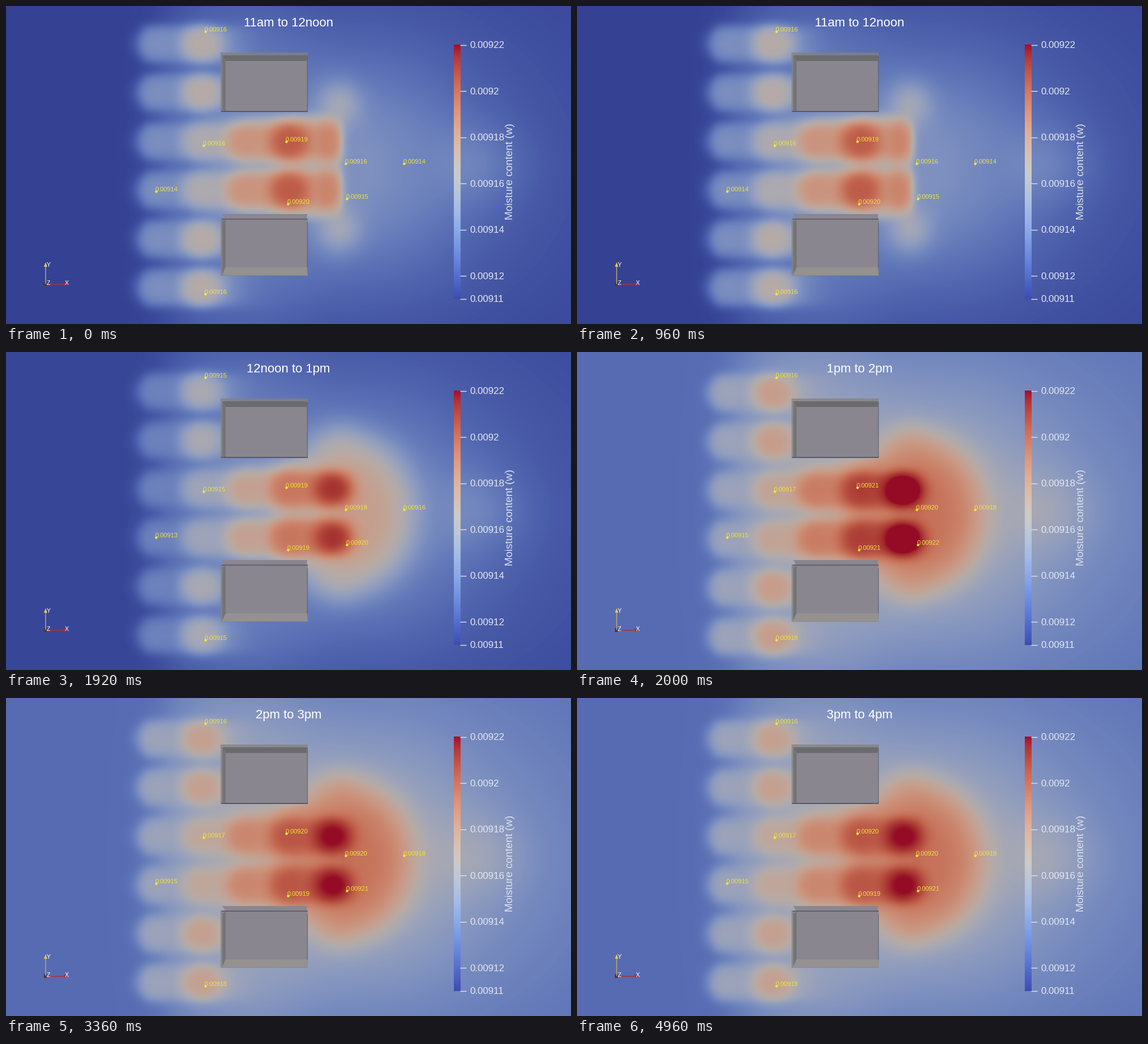
Write a matplotlib script that moves like this. It is 998 px wide and 561 px high and loops after 5.04 s.

```python
import numpy as np
import matplotlib.pyplot as plt
from matplotlib.animation import FuncAnimation
from matplotlib.patches import Polygon

W, H, DPI = 998, 561, 64
FRAMES, INTERVAL = 63, 80
FONT = "Liberation Sans"

CLOCK = ["11am", "12noon", "1pm", "2pm", "3pm", "4pm"]
# Per hour: background, first jet level, rise per jet column, plume spread.
# Levels run from 0 (0.00911) to 1 (0.00922).
LEVELS = [(.01, .27, .19, 0), (.02, .22, .18, 1), (.14, .39, .175, 1),
          (.14, .39, .155, 1), (.14, .39, .155, 1)]
# Last three digits at each probe, per hour
READINGS = ["916 916 919 916 914 914 920 915 916",
            "915 915 919 918 916 913 919 920 915",
            "916 917 921 920 918 915 921 922 918",
            "916 917 920 920 918 915 919 921 918",
            "916 917 920 920 918 915 919 921 918"]
PROBES = [(352, 45), (349, 246), (495, 239), (600, 278), (703, 278),
          (265, 327), (498, 349), (602, 340), (352, 508)]

X, Y = np.meshgrid(np.arange(W) + 0.5, np.arange(H) + 0.5)


def bump(cx, cy, rx, ry, k=1):
    return np.exp(-(((X - cx) / rx) ** 2 + ((Y - cy) / ry) ** 2) ** k)


def gate(v, start, width):
    """Soft step from 0 to 1; a negative width steps down."""
    return 1 / (1 + np.exp(-np.clip((v - start) / width, -50, 50)))


def mix(field, target, mask):
    return field + (target - field) * mask


def shade(values, gain, lift):
    rgb = plt.get_cmap("coolwarm")(np.clip(values, 0, 1))[..., :3]
    return np.clip(rgb * gain + lift, 0, 1)


def add_jets(field, row, hour):
    _, first, step, spread = LEVELS[hour]
    cy = 67 + 86 * row + min(2.5 * hour, 5)
    inner = row in (2, 3)
    count = 5 if inner else 2
    centers = 268 + 77.5 * np.arange(count)
    levels = first + step * np.arange(count)
    if inner:
        centers[-1] -= 11 * (1 - spread)
        levels[-1] -= 1.7 * step * (1 - spread)
        end, fade = 590 - 15 * spread, 5 + 10 * spread
    else:
        levels[-1] += 0.04
        end, fade = 395, 22

    trunk = np.exp(-((Y - cy) / 33) ** 4) * gate(X, 243, 5) * gate(X, end, -fade)
    field = mix(field, np.interp(X, centers, levels) - 0.07, 0.85 * trunk)
    for i, (cx, level) in enumerate(zip(centers, levels)):
        rx = 22 + 15 * spread if i == 4 else 37
        field = mix(field, level, bump(cx, cy, rx, 29 + i, 1.5))
    return field


def render(hour):
    base, first, _, spread = LEVELS[hour]
    far = 0.09 + 1.5 * base
    halo = first + 0.27
    inlet = gate(X, 275, 20)

    field = mix(np.full((H, W), base), far, bump(640, 280, 430, 330) * inlet)
    field = mix(field, far + 0.065, bump(400, 285, 190, 300, 2) * inlet)
    field = mix(field, far + 0.18, bump(620, 285, 180, 175) * inlet)
    field = mix(field, far + 0.13, bump(800, 280, 90, 65))
    for side in (-1, 1):
        field = mix(field, first + 0.15, bump(588, 284 + 108 * side, 38, 40))
    field = mix(field, halo, spread * bump(602, 285, 127, 142, 2.5))
    field = mix(field, halo + 0.11, spread * bump(602, 285, 88, 106, 2))

    ramp = np.clip((X - 320) / 190, 0, 1)
    channel = ramp * gate(X, 592, -4) * gate(Y, 191, 5) * gate(Y, 375, -5)
    field = mix(field, first + 0.23 + 0.08 * spread * ramp, channel * (1 - 0.3 * spread))
    for row in range(6):
        field = add_jets(field, row, hour)
    return shade(field, (0.80, 0.74, 0.71), (0.02, 0.03, 0.04))


fig = plt.figure(figsize=(W / DPI, H / DPI), dpi=DPI)
ax = fig.add_axes([0, 0, 1, 1])
ax.axis("off")


def pt(px):
    return px * 72 / DPI


def label(x, y, text, px, color="white", **kw):
    return ax.text(x, y, text, fontsize=pt(px), color=color, family=FONT, **kw)


def line(x, y, color, px=1.2):
    ax.plot(x, y, color=color, lw=pt(px), solid_capstyle="butt")


def poly(color, *points, alpha=1):
    ax.add_patch(Polygon(points, fc=color, ec="none", alpha=alpha))


def rect(color, x0, y0, x1, y1, alpha=1):
    poly(color, (x0, y0), (x1, y0), (x1, y1), (x0, y1), alpha=alpha)


def draw_block(top, face_top, face_bottom, bottom, rim, sill):
    """A grey block seen from above with its lit or shaded side walls."""
    rect("#84827f", 379, top, 533, bottom, 0.75)
    poly(rim, (382, face_top - 10), (532, face_top - 10), (531, face_top), (388, face_top))
    poly("#747477", (382, top + 5), (388, face_top), (388, face_bottom), (382, bottom - 3))
    poly(sill, (388, face_bottom), (531, face_bottom), (533, bottom - 1), (382, bottom - 1))
    rect("#898690", 388, face_top, 531, face_bottom)
    line([532, 532], [top + 6, face_bottom], "#626376")


def draw_colorbar():
    ramp = shade(np.linspace(1, 0, 449)[:, None], 0.87, 0.04)
    ax.imshow(ramp, extent=(791, 802.5, 517.5, 68.5), aspect="auto", zorder=1)
    for value in (922, 920, 918, 916, 914, 912, 911):
        y = 68.5 + (922 - value) * 40.77
        line([802.5, 813], [y, y], "#dfe3ee", 1.4)
        label(819, y + 5.5, f"0.00{value}".rstrip("0"), 17, "#e4e7f1")
    label(899, 292, "Moisture content (w)", 18.9, "#dde1ee", rotation=90,
          ha="right", va="center")


def draw_axes():
    line([70, 70], [490, 460], "#b9a774", 1.5)
    line([70, 104], [490.5, 490.5], "#b32d3c", 1.5)
    poly("#e8c93c", (70, 452), (67, 460), (73, 460))
    poly("#c3202c", (109, 490.5), (102, 487.5), (102, 493.5))
    rect("#3b3d3c", 67, 487, 72.5, 494)
    for x, y, name in ((71.5, 460, "Y"), (72, 491.5, "Z"), (103.5, 491.5, "X")):
        label(x, y, name, 10.5)


fields = [render(hour) for hour in range(len(LEVELS))]
picture = ax.imshow(fields[0], extent=(0, W, H, 0), interpolation="nearest", zorder=0)
draw_block(82, 97, 186, 187, "#6b6b6d", "#4d4e60")
line([380, 533], [185.7, 185.7], "#4d4e60", 1.6)
draw_block(375, 377, 461, 476, "#898690", "#949190")
rect("#858480", 379, 367, 533, 375, 0)
line([381, 533], [375.5, 375.5], "#565765", 1.6)
draw_colorbar()
draw_axes()
ax.scatter(*zip(*PROBES), s=pt(4.4) ** 2, c="#f6ea2c", lw=0, zorder=4)
readings = [label(x - 1.5, y - 0.5, "", 11.1, "#eee338", zorder=5) for x, y in PROBES]
title = label(499, 36, "", 22.1, ha="center")
ax.set_xlim(0, W)
ax.set_ylim(H, 0)


def update(frame):
    hour = int((frame + 0.3) * len(LEVELS) / FRAMES)
    title.set_text(f"{CLOCK[hour]} to {CLOCK[hour + 1]}")
    picture.set_data(fields[hour])
    for reading, digits in zip(readings, READINGS[hour].split()):
        reading.set_text("0.00" + digits)
    return [picture, title, *readings]


anim = FuncAnimation(fig, update, frames=FRAMES, interval=INTERVAL,
                     repeat=True, repeat_delay=0)
plt.show()
```
